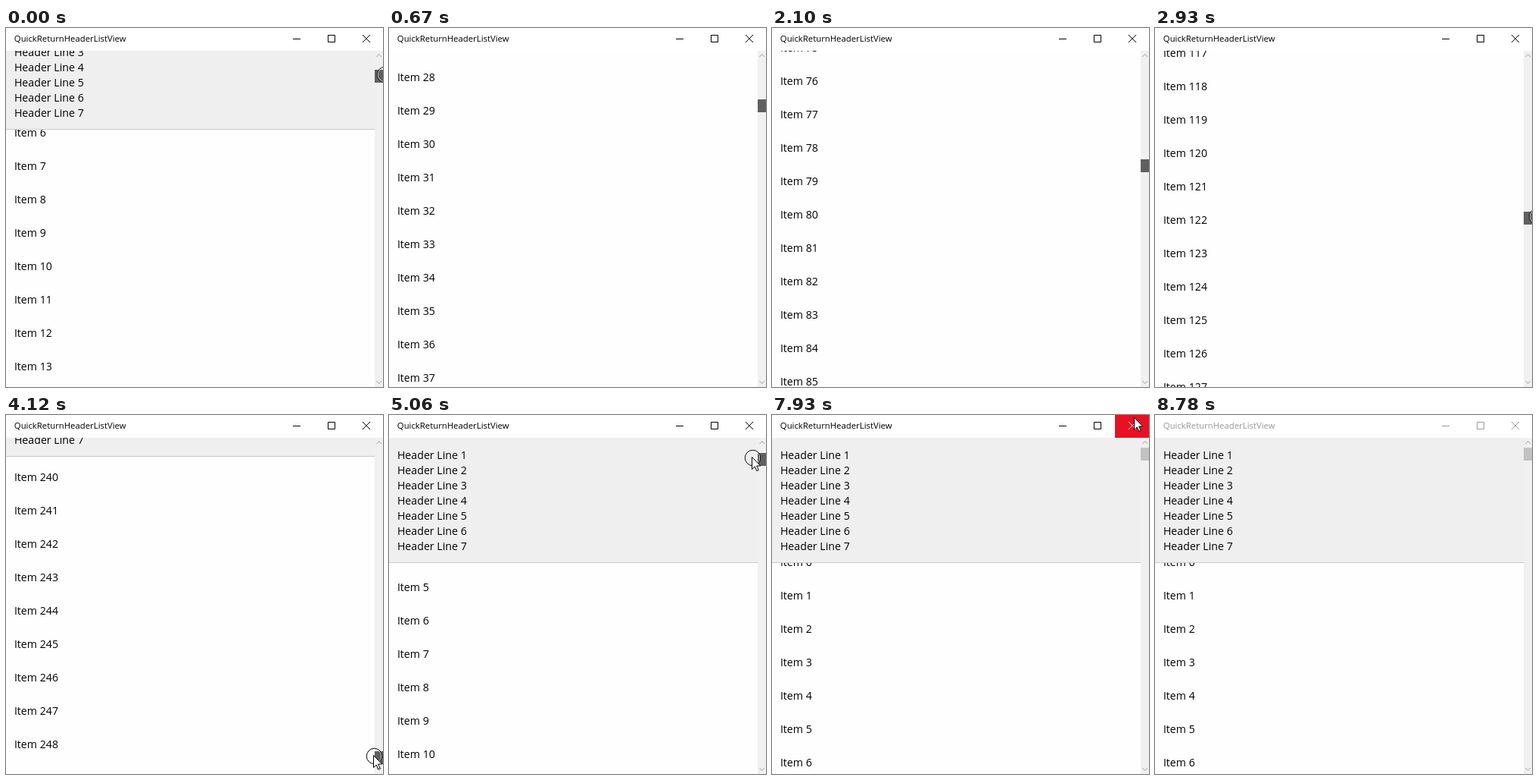
An HTML page for the animation above (8880 ms loop, 498 px wide and 473 px high).

```html
<!DOCTYPE html>
<html lang="en">
<head>
<meta charset="utf-8">
<title>QuickReturnHeaderListView</title>
<style>
  html, body { margin: 0; width: 100%; height: 100%; overflow: hidden; background: #fff; }
  svg { display: block; }
  text { font: 14.2px "Open Sans", "Noto Sans", sans-serif; fill: #000; white-space: pre; }
  #title { font-size: 11.35px; }
  .line { fill: none; stroke: #000; }
  .chevron { fill: none; stroke: #a0a0a0; }
</style>
</head>
<body>
<svg width="498" height="473" viewBox="0 0 498 473">
  <rect width="498" height="473" fill="#fefefe"/>
  <g id="items"></g>
  <g id="header">
    <rect y="30" width="487" height="164" fill="#efefef"/>
    <rect y="194" width="487" height="1" fill="#cbcbcb"/>
  </g>
  <rect x="487" y="30" width="11" height="443" fill="#f0f0f0"/>
  <path class="chevron" d="M489.5 38 L492.7 34.5 L496 38 M489.5 465 L492.7 468.5 L496 465"/>
  <rect id="thumb" x="487" width="11" height="17"/>
  <rect width="498" height="30" fill="#fff"/>
  <rect id="hot" x="453" width="45" height="30" fill="#e81123"/>
  <text id="title" x="10.8" y="18">QuickReturnHeaderListView</text>
  <path id="buttons" class="line" d="M379 14.5 H389 M425.5 9.5 H434.5 V18.5 H425.5 Z"/>
  <path id="close" class="line" d="M471 9 L481 19 M481 9 L471 19"/>
  <g id="pointer">
    <g id="ring" fill="none">
      <circle cx="1.5" cy="1.5" r="9.5" stroke="#fff"/>
      <circle cx="1.5" cy="1.5" r="10.2" stroke="#000"/>
    </g>
    <path d="M.5 .5 V16.5 L4.2 13 L6.8 18.6 L9.2 17.5 L6.7 12 H11.8 Z" fill="#fff" stroke="#000"/>
  </g>
</svg>
<script>
const LOOP = 8880, ROW = 44, COUNT = 250, HEADER = 165;
const TRACK_TOP = 43, PX_PER_DRAG = 26.68, MIN_SCROLL = -23, MAX_SCROLL = 10697;
const RELEASE = 7270, INACTIVE = 8780;

// Bursts of repaints: [first time, last time, count]
const bursts = [
  [0, 120, 2], [400, 1300, 8], [1450, 2380, 7], [2530, 2530, 1], [2810, 3660, 7],
  [4120, 5060, 8], [5210, 5750, 5], [6020, 6970, 8], [7270, 8200, 8], [INACTIVE, INACTIVE, 1]
];

// Turning points of the gesture: [time, value]
const dragKeys = [
  [0, 12], [1300, 90], [1700, 82], [2530, 196], [2810, 199], [3150, 196], [3660, 401],
  [4120, 400], [5060, 7], [5750, -23], [6020, 2], [6540, 19], [6970, 0]
];
const xKeys = [[0, 499], [1300, 516], [2810, 503], [4120, 485], [6300, 469], [7270, 467], [7930, 478]];
const exitKeys = [[6970, 53], [7930, 3], [8060, -30]];

const $ = id => document.getElementById(id);
const clamp = (v, lo, hi) => Math.min(hi, Math.max(lo, v));

// Smoothstep between neighbouring keys, rounded to whole pixels.
function ease(keys, t) {
  const i = keys.findIndex(k => k[0] > t);
  if (i < 0) return keys.at(-1)[1];
  const [t0, a] = keys[Math.max(0, i - 1)], [t1, b] = keys[i];
  const f = clamp((t - t0) / (t1 - t0 || 1), 0, 1);
  return Math.round(a + (b - a) * f * f * (3 - 2 * f));
}

function addText(parent, y, label) {
  const el = document.createElementNS("http://www.w3.org/2000/svg", "text");
  el.setAttribute("x", 10.9);
  el.setAttribute("y", y);
  el.textContent = label;
  return parent.appendChild(el);
}

for (let i = 0; i < 7; i++) addText($("header"), 58 + 20 * i, `Header Line ${i + 1}`);
const rows = Array.from({ length: 12 }, () => addText($("items"), 0, ""));

// The header hides while scrolling down and returns while scrolling up.
const steps = [];
for (const [from, to, count] of bursts) {
  for (let i = 0; i < count; i++) {
    const t = Math.floor((from + (to - from) * i / Math.max(1, count - 1)) / 10) * 10;
    const drag = ease(dragKeys, t);
    const scroll = clamp(Math.round(drag * PX_PER_DRAG), MIN_SCROLL, MAX_SCROLL);
    const prev = steps.at(-1);
    const hidden = prev ? clamp(prev.hidden + scroll - prev.scroll, 0, HEADER) : 61;
    steps.push({ t, drag, scroll, hidden });
  }
}

function draw(time) {
  const { t, drag, scroll, hidden } = steps.findLast(s => s.t <= time);
  const pressed = t < RELEASE;

  const first = Math.max(0, Math.floor((scroll - 194) / ROW));
  rows.forEach((row, i) => {
    const n = first + i;
    row.textContent = n < COUNT ? `Item ${n}` : "";
    row.setAttribute("y", 199 + ROW * n - scroll);
  });
  $("header").setAttribute("transform", `translate(0 ${-hidden})`);

  $("thumb").setAttribute("y", TRACK_TOP + clamp(drag, 0, 400));
  $("thumb").setAttribute("fill", pressed ? "#606060" : "#c2c2c2");

  const grip = t > 5750 ? 10 : 5;
  const x = ease(xKeys, t);
  const y = pressed ? TRACK_TOP + drag + grip : ease(exitKeys, t);
  $("pointer").setAttribute("transform", `translate(${x} ${y})`);
  $("ring").style.display = pressed ? "" : "none";

  const over = !pressed && x >= 453 && y >= 0 && y < 30;
  const ink = t >= INACTIVE ? "#999" : "#000";
  $("hot").style.opacity = over ? 1 : 0;
  $("title").style.fill = ink;
  $("buttons").style.stroke = ink;
  $("close").style.stroke = over ? "#fff" : ink;
}

const start = performance.now();
function tick() {
  draw((performance.now() - start) % LOOP);
  requestAnimationFrame(tick);
}
tick();
</script>
</body>
</html>
```
